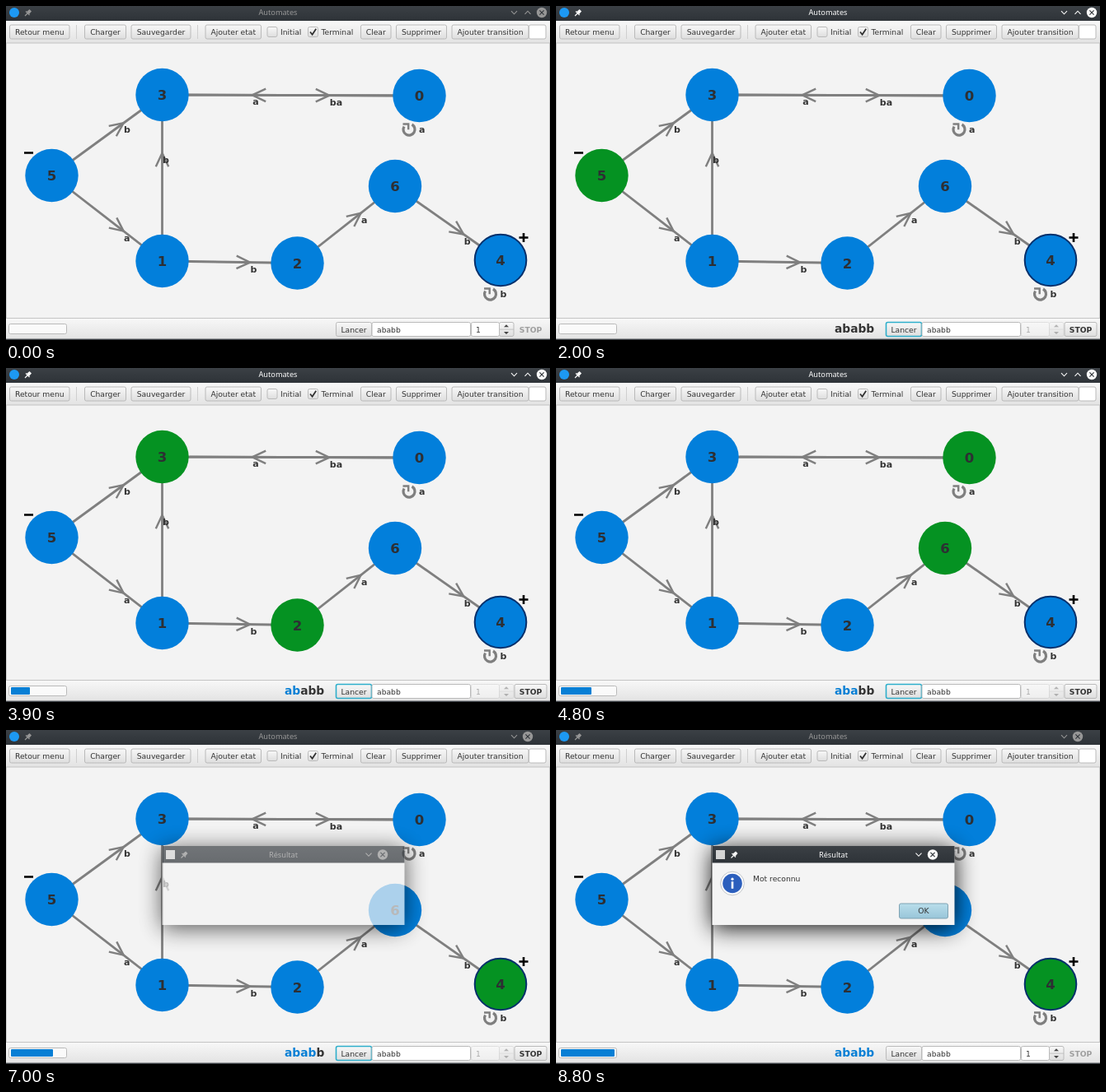
Recreate the animation shown at these times as an HTML page. Size 660 by 406 pixels, loop 8.9 s.

```html
<!DOCTYPE html>
<html lang="fr">
<head>
<meta charset="utf-8">
<title>Automates</title>
<style>
html, body { margin: 0; width: 100%; height: 100%; overflow: hidden; background: #f3f3f3; }
svg { display: block; width: 660px; height: 406px; }
text { font: 9.2px "DejaVu Sans", sans-serif; fill: #333; white-space: pre; }
.title { font: 9.2px "Noto Sans", sans-serif; fill: currentColor; }
.bold { font-weight: bold; }
.label { font-weight: bold; font-size: 11px; }
.state { font-weight: bold; font-size: 16.5px; fill: #2d2f33; }
.word { font-weight: bold; font-size: 13.8px; }
.mid { text-anchor: middle; }
.line { fill: none; stroke: #7f7f7f; stroke-width: 2.8; }
.sign { stroke: #000; stroke-width: 2.6; }
.glyph { fill: none; stroke: currentColor; stroke-width: 1.1; }
</style>
</head>
<body>
<svg id="stage" viewBox="0 0 660 406">
  <defs>
    <linearGradient id="bar" x2="0" y2="1"><stop stop-color="#f8f8f8"/><stop offset="1" stop-color="#e3e3e3"/></linearGradient>
    <linearGradient id="btn" x2="0" y2="1"><stop stop-color="#f8f8f8"/><stop offset="1" stop-color="#dedede"/></linearGradient>
    <linearGradient id="ok" x2="0" y2="1"><stop stop-color="#b9deeb"/><stop offset="1" stop-color="#98c5d9"/></linearGradient>
    <linearGradient id="head" x2="0" y2="1"><stop stop-color="#3b4045"/><stop offset="1" stop-color="#2e3338"/></linearGradient>
    <filter id="blur" x="-30%" y="-70%" width="160%" height="240%"><feGaussianBlur stdDeviation="14"/></filter>
  </defs>
</svg>
<script>
const LOOP = 8900, START = 1700, STEP = 1000, RESULT = 7200;
const BLUE = '#027fdb', GREEN = '#059222', WORD = 'ababb';

// id: x, y, index of the step in which the state is active
const states = {
  0: [501.5, 109, 3], 1: [189.5, 310, 1], 2: [353.5, 312.5, 2], 3: [189.5, 108, 2],
  4: [600, 309, 4], 5: [55.5, 206, 0], 6: [472, 219, 3]
};
const edges = [[5, 3, 'b'], [5, 1, 'a'], [1, 3, 'b'], [1, 2, 'b'], [3, 0, 'ba'],
  [0, 3, 'a'], [2, 6, 'a'], [6, 4, 'b']];

const text = (x, y, s, cls = '', more = '') => `<text x="${x}" y="${y}" class="${cls}" ${more}>${s}</text>`;
const rect = (x, y, w, h, fill, more = '') => `<rect x="${x}" y="${y}" width="${w}" height="${h}" fill="${fill}" ${more}/>`;
const path = (d, cls, more = '') => `<path d="${d}" class="${cls}" ${more}/>`;
const box = (x, y, w, h, fill, id = '') => rect(x, y, w, h, fill, `rx="2" stroke="#bababa" id="${id}"`);
const button = (x, y, w, s, cls = '', id = '') =>
  box(x, y, w, 17, 'url(#btn)', id) + text(x + w / 2, y + 12, s, 'mid ' + cls);

const pin = (x, y) => `<g transform="translate(${x} ${y})">` +
  path('M-4 4L-1 1M-3-1.5L1.5 3', 'glyph') +
  '<path d="M-2-1L1.5-4 4-1.5 1 2z" fill="currentColor"/></g>';
const chevron = (x, y, d) => path(`M${x - 3.5} ${y - d}l3.5 ${2 * d} 3.5 ${-2 * d}`, 'glyph');
const close = (x, y) => `<circle cx="${x}" cy="${y}" r="6.2" fill="currentColor"/>` +
  path(`M${x - 2.6} ${y - 2.6}l5.2 5.2m0-5.2l-5.2 5.2`, '', 'stroke="#31363b" stroke-width="1.2"');

function edge([from, to, s]) {
  const [x1, y1] = states[from], [x2, y2] = states[to];
  const x = x1 + (x2 - x1) * .65, y = y1 + (y2 - y1) * .65;
  const turn = Math.atan2(y2 - y1, x2 - x1) * 180 / Math.PI;
  return path(`M${x1} ${y1}L${x2} ${y2}`, 'line') +
    path('M-16.5-7.7L0 0-16.5 7.7', 'line', `transform="translate(${x} ${y}) rotate(${turn})" style="stroke-width:2.4"`) +
    text(x + .5, y + 12, s, 'label');
}

function selfLoop(id, s) {
  const [x, y] = states[id];
  return `<g transform="translate(${x - 12.5} ${y + 41})">` +
    path('M3.5-6A7 7 0 1 1-6-3.5', 'line', 'style="stroke-width:3.2"') +
    path('M-7.5-6.5H-.8V.2', 'line', 'style="stroke-width:2.4"') + '</g>' +
    text(x - .5, y + 44.7, s, 'label');
}

function state(id) {
  const [x, y] = states[id];
  const ring = id == 4 ? 'r="31.3" stroke="#052f6b" stroke-width="2"' : 'r="32.2"';
  return `<circle id="s${id}" cx="${x}" cy="${y}" ${ring}/>` + text(x, y + 6, id, 'state mid');
}

const checkbox = (x, s) => box(x, 25.5, 12, 12, 'url(#btn)') + text(x + 16, 35, s);

const titleBar = `<g id="main">${rect(0, 0, 660, 18, 'url(#head)')}
  <circle cx="10" cy="8" r="6" fill="#1d99f3"/>${pin(27, 8)}
  ${text(330, 11.3, 'Automates', 'title mid')}${chevron(616.5, 8, 1.8)}
  <g id="max">${chevron(633, 8, -1.8)}</g><g id="close">${close(650, 8)}</g></g>`;

const toolBar = rect(0, 18, 660, 27, 'url(#bar)') + rect(0, 44.5, 660, 1, '#c4c4c4') +
  rect(85, 23, 1, 17, '#cfcfcf') + rect(232, 23, 1, 17, '#cfcfcf') +
  [[4.5, 72.5, 'Retour menu'], [95.5, 50, 'Charger'], [152, 72, 'Sauvegarder'], [242, 67.5, 'Ajouter etat'],
    [430.5, 36.5, 'Clear'], [473.5, 61, 'Supprimer'], [541, 93, 'Ajouter transition']]
    .map(([x, w, s]) => button(x, 23, w, s)).join('') +
  checkbox(317, 'Initial') + checkbox(366.5, 'Terminal') +
  path('M369 31.5l2.6 3.2 4.6-7', '', 'fill="none" stroke="#333" stroke-width="1.8"') +
  box(634.5, 23, 20.5, 17, '#fff');

const graph = edges.map(edge).join('') + selfLoop(0, 'a') + selfLoop(4, 'b') +
  Object.keys(states).map(state).join('') +
  path('M22 178.5h11M622.5 281.5h11M628 276v11', 'sign');

const bottomBar = rect(0, 379, 660, 26, 'url(#bar)') + rect(0, 379, 660, 1, '#c4c4c4') +
  rect(0, 404.6, 660, 1.4, '#3a3f44') +
  box(3.5, 386.5, 70, 12, '#fafafa') + rect(6, 388, 0, 9, '#077fd5', 'id="fill" rx="1"') +
  '<text x="338" y="397" class="word" id="word"><tspan id="done" fill="#077fd5"></tspan><tspan id="todo"></tspan></text>' +
  `<g id="spin">${box(564.5, 384.5, 34, 17, '#fff')}${box(598.5, 384.5, 17.5, 17, 'url(#btn)')}
    ${text(570, 396.5, '1')}${rect(598.5, 392.7, 17.5, .8, '#bababa')}
    <path d="M604 390.3l3-3 3 3zM604 396l3 3 3-3z" fill="#444"/></g>` +
  button(400.5, 384.5, 43, 'Lancer', '', 'run') +
  box(444, 384.5, 119.5, 17, '#fff', 'field') + text(450, 396.5, WORD) + rect(479.3, 387.5, 1, 11, '#222', 'id="caret"') +
  `<g id="stop">${button(617, 384.5, 39, 'STOP', 'bold')}</g>`;

const dialog = `<g id="dialog">
  ${rect(189.5, 145, 294, 96, '#000', 'filter="url(#blur)" opacity=".92"')}
  ${rect(189.5, 141, 294, 96, '#f4f4f4')}
  <g id="dialogHead">${rect(189.5, 141, 294, 20.5, 'url(#head)')}
    ${rect(194, 146, 11, 11, '#d5d5d5')}${pin(216.5, 151.5)}
    ${text(336.5, 154.6, 'Résultat', 'title mid')}${chevron(440, 151.5, 1.8)}${close(457, 151.5)}</g>
  <g id="content">
    <circle cx="214" cy="186.5" r="14.3" fill="#fdfdfd" stroke="#c3c6ca"/>
    <circle cx="214" cy="186.5" r="11.8" fill="#2c5fbd"/>
    <circle cx="214" cy="181.2" r="1.6" fill="#fff"/>${rect(212.7, 184.2, 2.6, 8.6, '#fff')}
    ${text(239, 183.7, 'Mot reconnu')}
    ${rect(416.5, 211, 59, 18, 'url(#ok)', 'id="okBox" rx="2" stroke="#7fa3b3"')}
    ${text(446, 223.4, 'OK', 'mid')}</g></g>`;

const stage = document.getElementById('stage');
stage.insertAdjacentHTML('beforeend',
  rect(0, 0, 660, 406, '#f3f3f3') + rect(0, 45, .8, 335, '#c4c4c4') + rect(659.2, 45, .8, 335, '#c4c4c4') +
  graph + toolBar + bottomBar + titleBar + dialog);

const $ = id => document.getElementById(id);
const set = (id, name, value) => $(id).setAttribute(name, value);
const show = (id, on) => set(id, 'visibility', on ? 'inherit' : 'hidden');
const ramp = (t, from, to) => Math.min(1, Math.max(0, (t - from) / (to - from)));
const grey = k => { const v = Math.round(150 + 102 * k); return `rgb(${v},${v},${v})`; };

function focus(id, on) {
  set(id, 'stroke', on ? '#2eaecb' : '#bababa');
  set(id, 'stroke-width', on ? 1.6 : 1);
}

function draw(t) {
  const running = t >= START && t < RESULT;
  const step = Math.min(4, Math.floor((t - START) / STEP));
  const read = t >= RESULT ? 5 : Math.max(0, step);

  for (const id in states) set('s' + id, 'fill', states[id][2] === step ? GREEN : BLUE);

  show('word', t >= START);
  $('done').textContent = WORD.slice(0, read);
  $('todo').textContent = WORD.slice(read);
  set('fill', 'width', Math.max(0, 14 * read - 5));
  set('spin', 'opacity', running ? .35 : 1);
  set('stop', 'opacity', running ? 1 : .42);
  $('stop').firstChild.setAttribute('visibility', running ? 'inherit' : 'hidden');
  const typing = t >= 1200 && t < START;
  focus('field', typing);
  show('caret', typing);
  focus('run', running);

  const modal = t >= 6800;
  set('main', 'color', grey(ramp(t, 1200, 1400) * (1 - ramp(t, 6800, 7000))));
  show('max', !modal);
  set('close', 'transform', `translate(${modal ? -17 : 0} 0)`);

  set('dialog', 'opacity', ramp(t, 6850, 7065));
  set('dialogHead', 'color', grey(ramp(t, 7030, 7230)));
  show('content', t >= RESULT);
  set('okBox', 'fill-opacity', t >= 8700 ? 1 : .85);
}

const origin = performance.now();
function tick() {
  draw((performance.now() - origin) % LOOP);
  requestAnimationFrame(tick);
}
tick();
</script>
</body>
</html>
```
